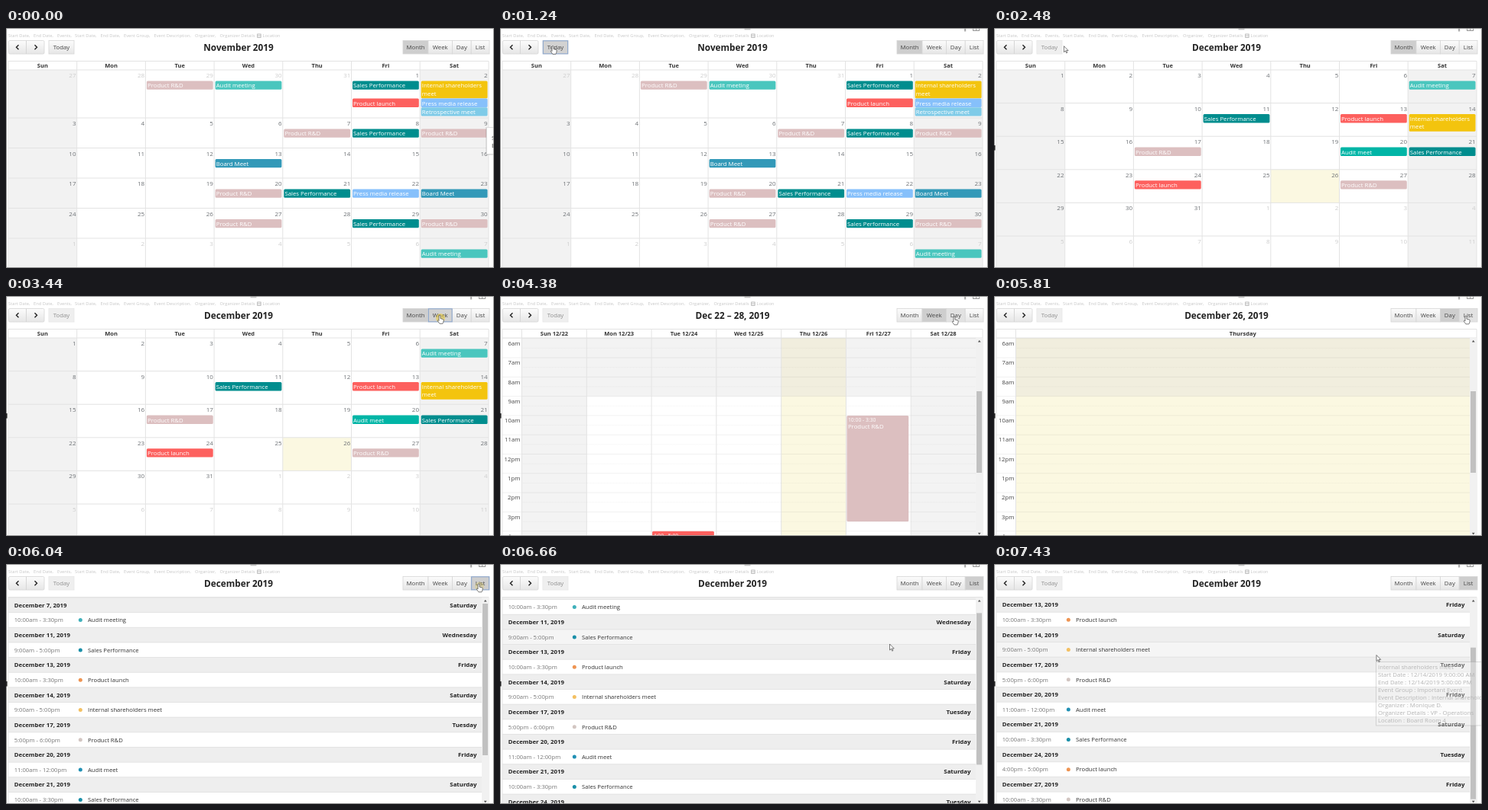
An HTML page that plays this animation: 638x315 px, repeating every 7530 ms.

```html
<!DOCTYPE html>
<html lang="en">
<head>
<meta charset="utf-8">
<title>Event calendar</title>
<style>
  html, body { margin: 0; width: 100%; height: 100%; overflow: hidden; background: #fff; }
  svg { display: block; width: 638px; height: 315px; font-family: "Open Sans", "Noto Sans", sans-serif; }
  text { white-space: pre; }
  .b { font-weight: 700; }
  .mid { text-anchor: middle; }
  .end { text-anchor: end; }
</style>
</head>
<body>
<svg id="stage" viewBox="0 0 638 315"></svg>
<script>
const LOOP = 7530;
const KINDS = {
  rd: ['Product R&amp;D', '#dcbfc0', '#d2c6c2'],
  audit: ['Audit meeting', '#4ac6be', '#3fb0ba'],
  meet: ['Audit meet', '#00b5a6', '#2190b4'],
  sales: ['Sales Performance', '#008d8e', '#1a8fa8'],
  launch: ['Product launch', '#fd605e', '#ee9452'],
  internal: ['Internal shareholders meet', '#f3c40e', '#f3c062'],
  press: ['Press media release', '#86c0fb'],
  retro: ['Retrospective meet', '#7fcbe8'],
  board: ['Board Meet', '#3399b8']
};
const DAYS = ['Sunday', 'Monday', 'Tuesday', 'Wednesday', 'Thursday', 'Friday', 'Saturday'];
const TODAY = '#fbf8e1';

const rect = (x, y, w, h, fill, more = '') =>
  `<rect x="${x}" y="${y}" width="${w}" height="${h}" fill="${fill}" ${more}/>`;
const line = (x1, y1, x2, y2, color = '#e3e3e3', more = '') =>
  `<path d="M${x1} ${y1}L${x2} ${y2}" stroke="${color}" ${more}/>`;
const text = (x, y, s, size = 7.8, fill = '#333', cls = '') =>
  `<text x="${x}" y="${y}" font-size="${size}" fill="${fill}" class="${cls}">${s}</text>`;
const group = (id, body, more = '') => `<g id="${id}" ${more}>${body}</g>`;

// Month view: events are [month, day, kind, slot]
const COL = 89.7;
function month(id, start, current, tops, events) {
  const colX = c => 3 + c * COL;
  let out = rect(3, 55, COL, 260, '#f2f2f2') + rect(colX(6), 55, COL, 260, '#f2f2f2');
  if (current === 11) out += rect(colX(4), tops[3], COL, tops[4] - tops[3], TODAY);
  DAYS.forEach((d, c) => {
    out += text(colX(c + .5), 52.2, d.slice(0, 3), 7.5, '#333', 'b mid');
    out += line(colX(c), 43.5, colX(c), 315);
  });
  out += line(3, 43.5, 631, 43.5) + line(631, 43.5, 631, 315);
  tops.forEach(y => out += line(3, y, 631, y));
  for (let i = 0; i < 42; i++) {
    const d = new Date(2019, start[0], start[1] + i);
    const x = colX(i % 7), y = tops[i / 7 | 0];
    const color = d.getMonth() === current ? '#6d7175' : '#cdcdcd';
    out += text(x + COL - 1.2, y + 10, d.getDate(), 8, color, 'end');
    for (const [m, day, kind, slot = 0] of events) {
      if (m !== d.getMonth() || day !== d.getDate()) continue;
      const [label, fill] = KINDS[kind], top = y + 14.4 + slot * 11.6;
      const lines = kind === 'internal' ? ['Internal shareholders', 'meet'] : [label];
      out += rect(x + 1.5, top, 86.8, lines.length * 11.4, fill, 'rx="1.5"');
      lines.forEach((s, n) => out += text(x + 2.6, top + 8.9 + n * 10.4, s, 7.8, '#fff'));
    }
  }
  return group(id, out);
}

function bar(top, y, h, id) {
  return rect(622, top, 9, 315 - top, '#f1f1f1') +
    `<path d="M624.8 ${top + 5.5}l1.9 -2.4 1.9 2.4zM624.8 310.8l1.9 2.4 1.9 -2.4z" fill="#505050"/>` +
    rect(623, y, 7, h, '#c1c1c1', id ? `id="${id}"` : '');
}

// Time grid shared by the week and day views
const HOUR = 25.3, SIX = 55.7;
const hourY = h => SIX + (h - 6) * HOUR;
function timeGrid(id, days, events) {
  const w = 593.5 / days.length, colX = c => 28.5 + c * w;
  const shade = 'rgba(215,215,215,.3)';
  let out = '';
  days.forEach(([label, today, off], c) => {
    if (today) out += rect(colX(c), 55, w, 260, TODAY);
    out += rect(colX(c), 55, w, off ? 260 : hourY(9) - 55, shade);
    out += text(colX(c + .5), 52.2, label, 7.5, '#333', 'b mid');
  });
  for (let h = 6; h < 17; h++) {
    const y = hourY(h), name = (h + 11) % 12 + 1 + (h < 12 ? 'am' : 'pm');
    out += text(26.5, y + 9.2, name, 7.8, '#444', 'end');
    out += line(3, y, 622, y, 'rgba(0,0,0,.06)');
    out += line(28, y + HOUR / 2, 622, y + HOUR / 2, 'rgba(0,0,0,.05)', 'stroke-dasharray="1 1"');
  }
  days.forEach((d, c) => out += line(colX(c), 43.5, colX(c), 315));
  for (const [c, from, to, time, kind] of events) {
    const [label, fill] = KINDS[kind], y = hourY(from);
    out += rect(colX(c) + 1, y, w - 4, (to - from) * HOUR, fill, 'rx="1.5"');
    out += text(colX(c) + 2.5, y + 8, time, 6.8, '#fff') + text(colX(c) + 2.5, y + 17.5, label, 7.8, '#fff');
  }
  out += line(3, 43.5, 631, 43.5) + line(3, 55, 631, 55) + line(3, 43.5, 3, 315) + line(631, 43.5, 631, 315);
  return group(id, out + bar(55, 125, 107));
}

// List view
const ITEM = 39.3, LIST = [
  [7, '10:00am - 3:30pm', 'audit'], [11, '9:00am - 5:00pm', 'sales'],
  [13, '10:00am - 3:30pm', 'launch'], [14, '9:00am - 5:00pm', 'internal'],
  [17, '5:00pm - 6:00pm', 'rd'], [20, '11:00am - 12:00pm', 'meet'],
  [21, '10:00am - 3:30pm', 'sales'], [24, '4:00pm - 5:00pm', 'launch'],
  [27, '10:00am - 3:30pm', 'rd']
];
function list() {
  let rows = rect(3, 0, 619, 19.6, '#f5f5f5', 'id="rowHover"');
  LIST.forEach(([day, time, kind], i) => {
    const y = 44 + i * ITEM, [label, , dot] = KINDS[kind];
    const weekday = DAYS[new Date(2019, 11, day).getDay()];
    rows += rect(3, y, 619, 19.6, '#eee') + line(3, y, 622, y) + line(3, y + 19.6, 622, y + 19.6);
    rows += text(10.7, y + 12.6, `December ${day}, 2019`, 7.85, '#222', 'b');
    rows += text(615.5, y + 12.6, weekday, 7.85, '#222', 'b end');
    rows += text(10.7, y + 32.3, time, 7.65, '#777') + text(107, y + 32.3, label, 7.65, '#333');
    rows += `<circle cx="97.3" cy="${y + 29.6}" r="2.5" fill="${dot}"/>`;
  });
  return group('list', `<g clip-path="url(#listClip)">${group('rows', rows)}</g>` +
    line(3, 43.5, 631, 43.5) + line(3, 43.5, 3, 315) + line(631, 43.5, 631, 315) + bar(44, 52, 199, 'thumb'));
}

const BUTTONS = [['Today', 56, 33], ['Month', 519, 33], ['Week', 552, 31.5], ['Day', 583.5, 24.7], ['List', 608.2, 23.8]];
const button = ([name, x, w]) => group('btn' + name,
  rect(x, 16.5, w, 17.5, 'url(#face)', 'stroke="#d6d6d6" stroke-width=".8"') +
  text(x + w / 2, 28, name, 7.8, '#444', 'mid'));

const FIELDS = [[3, 'Start Date,'], [36, 'End Date,'], [67, 'Events,'], [90, 'Start Date,'], [123.5, 'End Date,'],
  [154, 'Event Group,'], [193.5, 'Event Description,'], [247, 'Organizer,'], [279.5, 'Organizer Details'], [335.5, 'Location']];
const toolbar = FIELDS.map(([x, s]) => text(x, 12.3, s, 5.75, '#c6c6c6')).join('') +
  rect(328.7, 8, 4.4, 4.4, 'none', 'stroke="#aaa" stroke-width=".8"') + line(329, 10.2, 333, 10.2, '#aaa', 'stroke-width=".7"') +
  rect(3.5, 16.5, 46.5, 17.5, 'url(#face)', 'rx="1.5" stroke="#d6d6d6" stroke-width=".8"') + line(26.5, 16.5, 26.5, 34, '#d6d6d6') +
  '<path d="M16.5 22.2l-3 3 3 3M37.5 22.2l3 3 -3 3" fill="none" stroke="#222" stroke-width="1.4"/>' +
  BUTTONS.map(button).join('') +
  rect(0, 16.8, 0, 17, 'none', 'id="ring" stroke="#8fa9cf" stroke-width="1.1"');

const TIP = ['Internal shareholders meet', 'Start Date : 12/14/2019 9:00:00 AM', 'End Date : 12/14/2019 5:00:00 PM',
  'Event Group : Important Event', 'Event Description : Internal shareholders meet', 'Organizer : Monique D.',
  'Organizer Details : VP - Operations', 'Location : Board Room 4'];
const tip = rect(499.5, 128.5, 150, 83.5, 'rgba(246,246,246,.35)', 'stroke="rgba(150,150,150,.35)"') +
  TIP.map((s, i) => text(502, 138 + i * 10.05, s, 7.8, '#b6b6b6')).join('');

const weekDays = DAYS.map((d, i) => [`${d.slice(0, 3)} 12/${22 + i}`, i === 4, i % 6 === 0]);
const stage = document.getElementById('stage');
stage.innerHTML = `<defs>
  <linearGradient id="face" x2="0" y2="1"><stop stop-color="#fcfcfc"/><stop offset="1" stop-color="#e6e6e6"/></linearGradient>
  <clipPath id="listClip"><rect x="3" y="43.5" width="619" height="272"/></clipPath></defs>` +
  rect(0, 0, 638, 315, '#fff') +
  month('nov', [9, 27], 10, [55, 118, 157.5, 197, 236.5, 276], [
    [9, 29, 'rd'], [9, 30, 'audit'], [10, 1, 'sales'], [10, 1, 'launch', 2], [10, 2, 'internal'], [10, 2, 'press', 2],
    [10, 2, 'retro', 3], [10, 7, 'rd'], [10, 8, 'sales'], [10, 9, 'rd'], [10, 13, 'board'], [10, 20, 'rd'], [10, 21, 'sales'],
    [10, 22, 'press'], [10, 23, 'board'], [10, 27, 'rd'], [10, 29, 'sales'], [10, 30, 'rd'], [11, 7, 'audit']]) +
  month('dec', [11, 1], 11, [0, 1, 2, 3, 4, 5].map(i => 55 + i * 43.6), LIST.map(([day, , kind]) => [11, day, kind])) +
  timeGrid('week', weekDays, [[2, 16, 17, '4:00 - 5:00', 'launch'], [5, 10, 15.5, '10:00 - 3:30', 'rd']]) +
  timeGrid('day', [['Thursday', true, false]], []) + list() + toolbar +
  '<text id="title" x="304" y="30" font-size="11.75" class="b mid" fill="#222"></text>' +
  group('icons', rect(607, 0, 2.2, 4.5, '#aaa') + rect(618.5, -2, 8, 5.5, 'none', 'stroke="#999"') +
    line(622.5, 0, 622.5, 3.5, '#999') + line(319.5, 1.8, 327.5, 1.8, '#aaa')) +
  group('popup', rect(627, 130, 14, 37, '#000', 'opacity=".1"') + rect(628.5, 130.5, 14, 35, '#fff', 'stroke="#ddd"') +
    text(635, 147, 'Start', 7.8) + text(635, 157, 'End', 7.8)) +
  group('tip', tip) + rect(.5, .5, 637, 314, 'none', 'stroke="#8c8c8c"') + rect(0, 154, 1.6, 6.5, '#222', 'id="mark"') +
  '<circle id="click" r="6" fill="#f0d23c"/>' +
  group('cursor',
    '<path id="hand" d="M0 0c.8 0 1 .5 1 1.1v3l3.2.8c.8.2 1.1.8 1 1.5l-.5 2.6-.8 1.8h-4l-2.4-3.4c-.6-.8.4-1.6 1-1l.5.5V1.1C-1 .5-.7 0 0 0z"/>' +
    '<path id="arrow" d="M0 0v8l1.9-1.7 1.3 2.9 1.2-.6-1.3-2.7h2.6z"/>', 'fill="#fff" stroke="#444" stroke-width=".7"');

const $ = id => document.getElementById(id);
const show = (id, on) => { $(id).style.display = on ? '' : 'none'; };
const at = (steps, t) => steps.filter(s => s[0] <= t).pop();

// [first change, last change, steps, x, y]
const MOVES = [
  [220, 920, 10, 67, 25], [1000, 1000, 1, 69, 23.5], [2480, 3040, 8, 591, 28], [3200, 3280, 2, 567, 25.5],
  [4010, 4220, 4, 594, 27], [5310, 5880, 8, 618, 26], [6290, 6580, 5, 509.5, 105],
  [6750, 6970, 4, 501, 117], [7050, 7270, 4, 500, 119.5]
];
function pointer(t) {
  let x = 640, y = 150;
  for (const [from, to, n, tx, ty] of MOVES) {
    if (t < from) break;
    const step = n > 1 ? Math.min(n, 1 + Math.floor((t - from) * (n - 1) / (to - from) + 1e-6)) : 1;
    const p = step / n, e = p * p * (3 - 2 * p);
    x += (tx - x) * e;
    y += (ty - y) * e;
  }
  return [x, y];
}

// [time, view, title, active button]
const VIEWS = [
  [0, 'nov', 'November 2019', 'Month'], [1320, 'dec', 'December 2019', 'Month'],
  [3600, 'week', 'Dec 22 – 28, 2019', 'Week'], [4770, 'day', 'December 26, 2019', 'Day'],
  [6040, 'list', 'December 2019', 'List']
];
const FOCUS = [[0, ''], [1170, 'Today'], [1320, ''], [3360, 'Week'], [3760, ''], [4540, 'Day'], [4920, ''], [5880, 'List'], [6110, '']];
const SCROLL = [[0, 0], [6580, 6], [6660, 17], [6750, 40], [6820, 60], [6890, 74], [6970, 79]];
const CLICK = [[0, 0], [3360, .55], [3600, 0], [6040, .25], [6110, 0]];

function draw(t) {
  const [, view, title, active] = at(VIEWS, t), focus = at(FOCUS, t)[1], scroll = at(SCROLL, t)[1];
  const [x, y] = pointer(t);
  VIEWS.forEach(v => show(v[1], v[1] === view));
  $('title').textContent = title;

  let hand = false;
  show('ring', focus);
  for (const [name, bx, w] of BUTTONS) {
    const enabled = name !== 'Today' || view === 'nov';
    const over = enabled && x >= bx && x < bx + w && y > 16 && y < 34;
    const el = $('btn' + name);
    const fill = !enabled ? '#e6e6e6' : name === active ? '#cecece' : focus === name ? '#d2d2d2' : over ? '#e2e2e2' : 'url(#face)';
    hand = hand || over;
    el.firstChild.setAttribute('fill', fill);
    el.setAttribute('opacity', enabled ? 1 : .6);
    if (name === focus) {
      $('ring').setAttribute('x', bx + .4);
      $('ring').setAttribute('width', w - .8);
    }
  }

  const row = y - 44 + scroll, i = Math.floor(row / ITEM);
  show('rowHover', y > 44 && x < 622 && row - i * ITEM > 19.6);
  $('rowHover').setAttribute('y', 44 + i * ITEM + 19.6);
  $('rows').setAttribute('transform', `translate(0 ${-scroll})`);
  $('thumb').setAttribute('y', 52 + scroll * .73);

  show('popup', t < 220);
  show('icons', t >= 220);
  show('mark', t >= 1470);
  show('tip', t >= 7430);
  $('click').setAttribute('opacity', at(CLICK, t)[1]);
  $('click').setAttribute('cx', x + 1);
  $('click').setAttribute('cy', y + 3.5);
  show('cursor', t >= 220);
  show('hand', hand);
  show('arrow', !hand);
  $('cursor').setAttribute('transform', `translate(${x} ${y})`);
}

const start = performance.now();
function tick(now) {
  draw(Math.max(0, now - start) % LOOP);
  requestAnimationFrame(tick);
}
draw(0);
requestAnimationFrame(tick);
</script>
</body>
</html>
```
